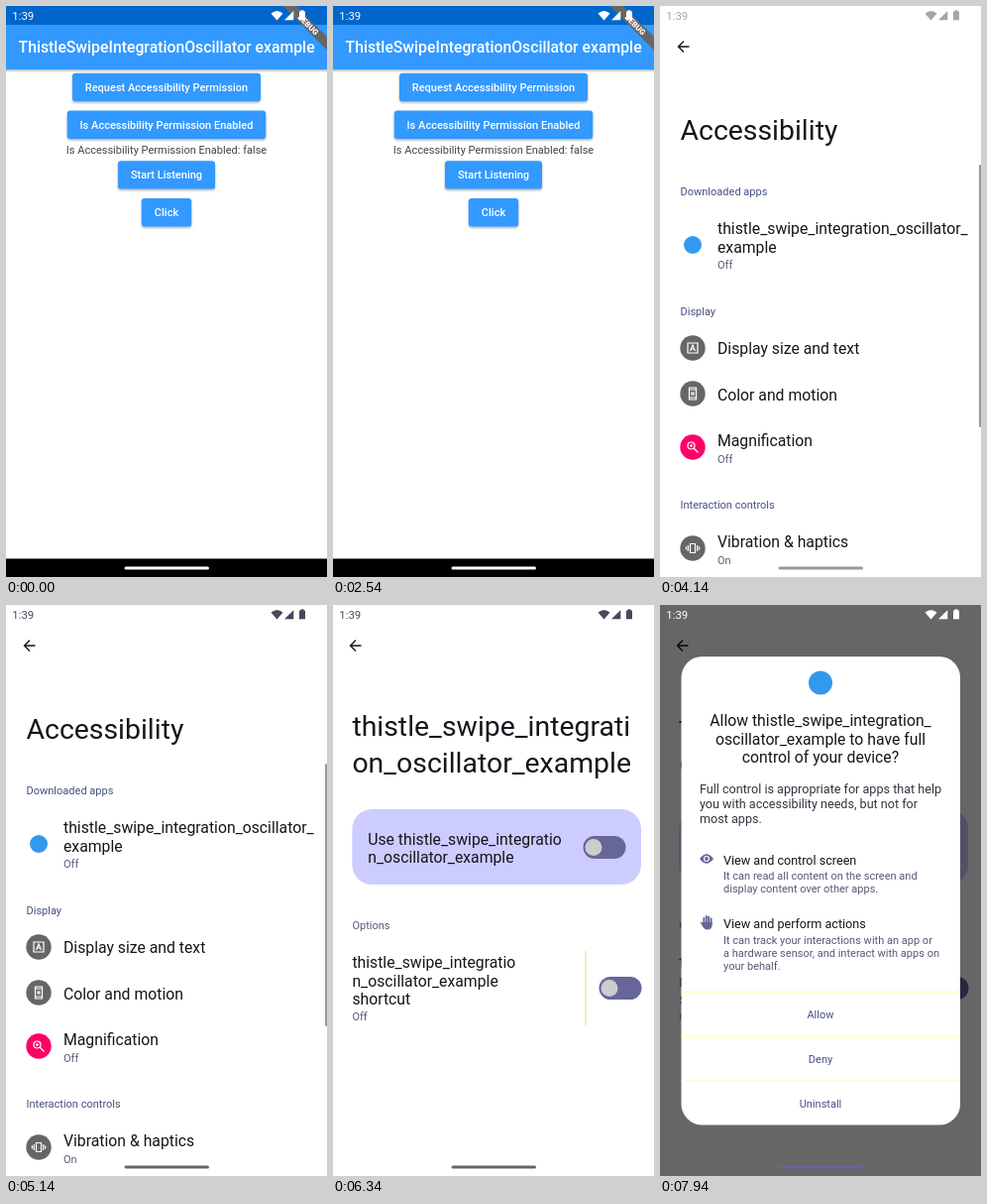
Write an HTML page that moves like this. It is 324 px wide and 576 px high and loops after 8 s.

```html
<!DOCTYPE html>
<html lang="en">
<head>
<meta charset="utf-8">
<title>Accessibility permission demo</title>
<style>
  html, body { margin: 0; width: 100%; height: 100%; overflow: hidden; background: #fff; }
  svg { display: block; width: 100%; height: 100%; font-family: Roboto, "Noto Sans", sans-serif; }
</style>
</head>
<body>
<svg id="stage" viewBox="0 0 324 576"></svg>
<script>
const SMALL = 11.03, BODY = 12.6, LARGE = 15.77, HUGE = 28.4;
const INK = '#15151c', SOFT = '#555a75', LINK = '#445080', VIOLET = '#666699', GREY = '#666666';

const text = (x, y, size, str, fill = INK, extra = '') =>
  `<text x="${x}" y="${y}" font-size="${size}" fill="${fill}" ${extra}>${str}</text>`;
const lines = (x, y, step, size, rows, fill, extra) =>
  rows.map((row, i) => text(x, y + i * step, size, row, fill, extra)).join('');
const rect = (x, y, w, h, fill, r = 0, extra = '') =>
  `<rect x="${x}" y="${y}" width="${w}" height="${h}" rx="${r}" fill="${fill}" ${extra}/>`;
const circle = (x, y, r, fill) => `<circle cx="${x}" cy="${y}" r="${r}" fill="${fill}"/>`;
const stroke = (d, color, width) => `<path d="${d}" fill="none" stroke="${color}" stroke-width="${width}"/>`;
const at = (x, y, body) => `<g transform="translate(${x} ${y})">${body}</g>`;
const MID = 'text-anchor="middle" ', BOLD = 'font-weight="500"';

const arrow = x => at(x, 41, stroke('M6 0H-5M.5-5.5L-5 0L.5 5.5', INK, 1.4));

const button = (y, width, label) =>
  rect(162 - width / 2, y - 14.2, width, 28.4, '#3399ff', 3.2, 'filter="url(#lift)"') +
  text(162, y + 4, SMALL, label, '#fff', MID + BOLD);

const toggle = (x, y) => rect(x, y, 43, 23, VIOLET, 11.5) + circle(x + 10.5, y + 11.5, 8.5, '#cccccc');

const badge = (y, color, glyph) => at(33, y, circle(0, 0, 12.7, color) + stroke(glyph, '#fff', 1.2));

const appPage =
  rect(0, 0, 324, 576, '#fff') +
  rect(0, 63, 324, 4, 'url(#shade)') +
  rect(0, 0, 324, 19, '#0066cc') +
  rect(0, 19, 324, 45, '#3399ff') +
  text(12.6, 47.3, LARGE, 'ThistleSwipeIntegrationOscillator example', '#fff', BOLD) +
  button(82, 190, 'Request Accessibility Permission') +
  button(119.8, 200.5, 'Is Accessibility Permission Enabled') +
  text(162, 149, SMALL, 'Is Accessibility Permission Enabled: false', '#444', MID) +
  button(170.4, 98, 'Start Listening') +
  button(208.2, 50.4, 'Click') +
  `<g transform="translate(324 0) rotate(45)">${rect(-31.5, 22, 63, 9.5, GREY)}
   ${text(0, 29.6, 8, 'DEBUG', '#fff', MID + 'font-weight="900"')}</g>` +
  rect(0, 557.5, 324, 18.5, '#000');

const settingsPage =
  arrow(23.5) +
  text(20.5, 135, HUGE, 'Accessibility') +
  text(20.5, 191, SMALL, 'Downloaded apps', LINK) +
  rect(0, 201, 324, 80, '#e8e8c8', 0, 'id="press"') +
  circle(33, 241, 9, '#3399ee') +
  lines(58, 230, 18.5, LARGE, ['thistle_swipe_integration_oscillator_', 'example']) +
  text(58, 265, SMALL, 'Off', SOFT) +
  text(20.5, 312, SMALL, 'Display', LINK) +
  badge(345, GREY, 'M-5-5H5V5H-5ZM-2.5 3L0-3L2.5 3M-1.6 1H1.6') +
  text(58, 351, LARGE, 'Display size and text') +
  badge(391, GREY, 'M-3.5-6H3.5V6H-3.5ZM-3.5-4H3.5M-3.5 4H3.5M-1-1H1V1H-1Z') +
  text(58, 397.5, LARGE, 'Color and motion') +
  badge(445, '#ff0066', 'M1.5 1.5L5.5 5.5M2-1.5A3.5 3.5 0 1 1-5-1.5A3.5 3.5 0 1 1 2-1.5M-3-1.5H0M-1.5-3V0') +
  text(58, 444, LARGE, 'Magnification') +
  text(58, 460.5, SMALL, 'Off', SOFT) +
  text(20.5, 507, SMALL, 'Interaction controls', LINK) +
  badge(547, GREY, 'M-2.5-4.5H2.5V4.5H-2.5ZM-4.7-3V3M4.7-3V3M-6.6-1.5V1.5M6.6-1.5V1.5') +
  text(58, 546, LARGE, 'Vibration &amp; haptics') +
  text(58, 563, SMALL, 'On', SOFT) +
  rect(322, 160, 2, 265, '#999', 1);

const detailPage =
  arrow(22.5) +
  lines(19.4, 132, 36.5, HUGE, ['thistle_swipe_integrati', 'on_oscillator_example']) +
  rect(19.4, 206, 291.6, 76, '#ccccff', 20) +
  lines(35.2, 241.5, 18.5, LARGE, ['Use thistle_swipe_integratio', 'n_oscillator_example']) +
  toggle(252.5, 233) +
  text(19.4, 327, SMALL, 'Options', SOFT) +
  lines(19.4, 366, 18.5, LARGE, ['thistle_swipe_integratio', 'n_oscillator_example', 'shortcut']) +
  text(19.4, 419, SMALL, 'Off', SOFT) +
  rect(254.5, 349, 1, 75, '#e2e290') +
  toggle(268.5, 375);

const eye = '<path d="M-7 0Q0-9.5 7 0Q0 9.5-7 0Z" fill="#666699"/>' + circle(0, 0, 3, '#fff') + circle(0, 0, 1.9, VIOLET);
const hand = `<path d="M-4 0H5.5V3Q5 7.5 1 7.5Q-2 7.5-3.5 5L-6.5 0Q-5.5-1-4 1Z" fill="${VIOLET}"/>` +
  [[-3.6, -5], [-1.2, -7], [1.2, -6.5], [3.6, -4.5]].map(([x, y]) => rect(x, y, 1.9, 9, VIOLET, 0.9)).join('');

const dialog =
  rect(21.5, 52, 281.5, 472.5, '#fff', 21, 'id="sheet"') +
  circle(162, 78.5, 12, '#3399ee') +
  lines(162, 122, 18.6, LARGE,
    ['Allow thistle_swipe_integration_', 'oscillator_example to have full', 'control of your device?'], INK, MID) +
  lines(40, 190, 14.8, BODY,
    ['Full control is appropriate for apps that help', 'you with accessibility needs, but not for', 'most apps.'], '#333340') +
  at(47, 256, eye) +
  text(64, 262, BODY, 'View and control screen') +
  lines(64, 277, 13.2, SMALL, ['It can read all content on the screen and', 'display content over other apps.'], SOFT) +
  at(47, 320, hand) +
  text(64, 326, BODY, 'View and perform actions') +
  lines(64, 341.5, 13.1, SMALL,
    ['It can track your interactions with an app or', 'a hardware sensor, and interact with apps on', 'your behalf.'], SOFT) +
  ['Allow', 'Deny', 'Uninstall'].map((label, i) =>
    rect(21.5, 389.7 + i * 45, 281.5, 1, '#ffff99') + text(162, 417 + i * 45, SMALL, label, LINK, MID)).join('');

const statusIcons =
  '<path d="M267.5 7.5Q273.5 2.5 279.5 7.5L273.5 14.5Z"/><path d="M281 14.3L290.3 5V14.3Z"/>' +
  '<path d="M297.5 4.3H300.5V5.5H302V14.3H296V5.5H297.5Z"/>';

const $ = id => document.getElementById(id);

$('stage').innerHTML = `
  <defs>
    <filter id="lift" x="-10%" y="-20%" width="120%" height="160%">
      <feDropShadow dx="0" dy="1.3" stdDeviation="0.8" flood-opacity="0.35"/></filter>
    <linearGradient id="shade" x2="0" y2="1">
      <stop stop-color="#000" stop-opacity=".4"/><stop offset="1" stop-color="#000" stop-opacity="0"/></linearGradient>
  </defs>
  <g id="app">${appPage}</g>
  <rect id="paper" width="324" height="576" fill="#fff"/>
  <g id="settings">${settingsPage}</g>
  <g id="detail">${detailPage}</g>
  <rect id="scrim" width="324" height="576"/>
  <g id="prompt">${dialog}</g>
  <g id="icons">${statusIcons}</g>
  ${text(6.3, 14, 11.4, '1:39', '#fff', 'id="clock"')}
  ${rect(119.5, 565.5, 85.5, 3, '#fff', 1.5, 'id="handle"')}`;

const ramp = (t, from, to) => Math.min(1, Math.max(0, (t - from) / (to - from)));
const easeOut = p => 1 - (1 - p) ** 3;
const mix = (a, b, p) => `rgb(${a.map((v, i) => Math.round(v + (b[i] - v) * p))})`;
const place = (id, x, opacity) => {
  $(id).setAttribute('transform', `translate(${x} 0)`);
  $(id).setAttribute('opacity', opacity);
};
const WHITE = [255, 255, 255], DARK = [72, 72, 94], DUSK = [102, 102, 102];
const LILAC = [212, 212, 255], DUSK_VIOLET = [102, 102, 153];

function draw(t) {
  const open = easeOut(ramp(t, 3740, 4040));
  const push = ramp(t, 5440, 5920), slide = 33 * easeOut(push);
  const ask = ramp(t, 7040, 7340);
  const tint = ramp(t, 4040, 4240);

  place('app', -32 * open, 1);
  place('paper', 32 * (1 - open), open);
  place('settings', 32 * (1 - open) - slide, open * (1 - ramp(push, 0, 0.62)));
  place('detail', 33 - slide, ramp(push, 0.1, 0.46));
  $('press').setAttribute('opacity', ramp(t, 5240, 5440));

  $('scrim').setAttribute('opacity', 0.6 * ask);
  place('prompt', 0, Math.min(1, 2.1 * ask));
  $('sheet').setAttribute('fill', mix(LILAC, WHITE, ramp(ask, 0.34, 1)));

  const bar = p => p > 0 ? mix(DARK, WHITE, p) : mix(WHITE, DARK, tint);
  $('icons').setAttribute('fill', bar(ask));
  $('clock').setAttribute('fill', bar(Math.min(1, 2.3 * ask)));
  $('handle').setAttribute('fill',
    ask > 0 ? mix(DUSK, DUSK_VIOLET, ramp(ask, 0.34, 1)) : mix(WHITE, DUSK, ramp(t, 3980, 4220)));
}

// The screen refreshes in steps of 100 ms.
function tick() {
  const t = performance.now() % 8000;
  draw(Math.max(0, Math.floor((t + 60) / 100) * 100 - 60));
  requestAnimationFrame(tick);
}
tick();
</script>
</body>
</html>
```
